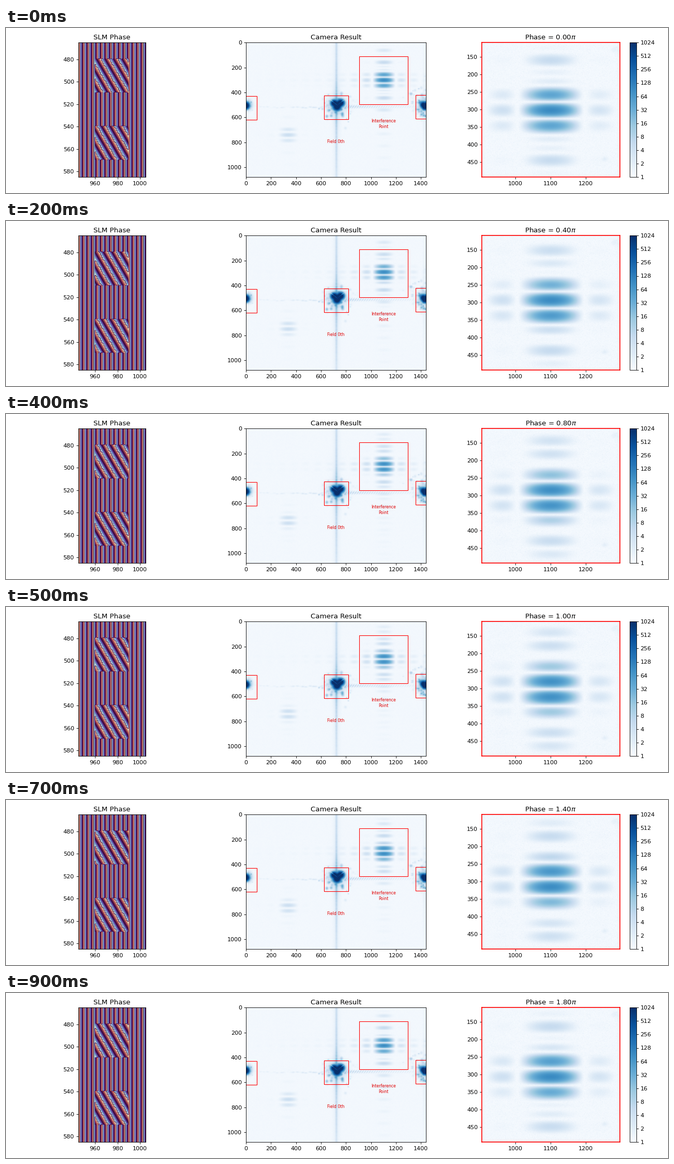
A matplotlib script that plays this animation: 1280x320 px, repeating every 1000 ms.

```python
import numpy as np
import matplotlib.pyplot as plt
from matplotlib.animation import FuncAnimation
from matplotlib.colors import LogNorm
from matplotlib.patches import Rectangle

W, H, DPI = 1280, 320, 80
STEPS = 10
NX, NY = 1440, 1080
LOBE, FRINGE = 96, 48        # envelope zero and fringe spacing, camera pixels
rng = np.random.default_rng(4)

fig = plt.figure(figsize=(W / DPI, H / DPI), dpi=DPI, facecolor="white")


def panel(left, right, top=28.2, bottom=289.2):
    return fig.add_axes([left / W, 1 - bottom / H, (right - left) / W, (bottom - top) / H])


# --- modulator phase -------------------------------------------------------
SX, SY = np.meshgrid(np.arange(945, 1006), np.arange(465, 586))
in_x = (SX >= 960) & (SX < 990)
upper = in_x & (SY >= 480) & (SY < 510)
lower = in_x & (SY >= 540) & (SY < 570)
grating = ((SX + 1) % 4) / 4 + 0.125
ramp = 0.1323 * SX - 0.0764 * SY


def slm_phase(turns):
    phase = np.where(lower, ramp % 1, grating)
    return np.where(upper, (ramp + turns) % 1, phase)


# --- camera image ----------------------------------------------------------
x = np.arange(NX, dtype=np.float32)
y = np.arange(NY, dtype=np.float32)


def add_spot(img, cx, cy, sx, sy, amp):
    """Add a Gaussian spot, touching only its neighbourhood."""
    x0, x1 = max(int(cx - 4 * sx), 0), min(int(cx + 4 * sx) + 1, NX)
    y0, y1 = max(int(cy - 4 * sy), 0), min(int(cy + 4 * sy) + 1, NY)
    if x0 >= x1 or y0 >= y1:
        return
    gx = np.exp(-((x[x0:x1] - cx) / sx) ** 2)
    gy = np.exp(-((y[y0:y1] - cy) / sy) ** 2)
    img[y0:y1, x0:x1] += amp * np.outer(gy, gx)


def scatter(img, cx, cy, dx, dy, count, amp, size=7):
    for _ in range(count):
        s = size * rng.uniform(0.6, 1.4)
        add_spot(img, rng.normal(cx, dx), rng.normal(cy, dy), s, s * rng.uniform(0.7, 1.2),
                 amp * rng.exponential())


def streak(img):
    """Vertical line through the zero order."""
    wobble = np.convolve(rng.uniform(0.5, 1.5, NY + 8), np.ones(9) / 9, "valid")
    along = wobble * (3.6 + 55 * np.exp(-np.abs(y - 500) / 55)) * np.clip((1300 - y) / 500, 0.4, 1)
    img += np.outer(along, np.exp(-((x - 721) / 7) ** 2))
    img += np.outer(0.5 + 5 * np.exp(-np.abs(y - 500) / 80), np.exp(-((x - 721) / 24) ** 2))


def hatch(img):
    """Slanted ticks right of the zero order, faint dashes left of it."""
    band = y[480:550, None] - 515
    ticks = np.cos(np.pi * (x[None] + 0.7 * band) / 19) ** 2
    fade = np.where(x > 760, 7 * np.exp(-(x - 760) / 190) + 0.4, 0)
    img[480:550] += ticks * fade * np.exp(-(band / 10) ** 2)
    for cx in range(120, 620, 26):
        add_spot(img, cx + rng.uniform(-8, 8), 520 + rng.uniform(-5, 5), 11, 5,
                 rng.uniform(0, 1) * (0.5 + 1.5 * cx / 620))


def static_image():
    img = 1 + 0.18 * rng.exponential(size=(NY, NX))
    streak(img)
    hatch(img)
    # zero order: heart-shaped core with a lighter V in it
    for cx, cy, s in ((704, 487, 16), (754, 485, 17), (726, 516, 18), (735, 497, 15)):
        add_spot(img, cx, cy, s, s * 0.95, 2600)
    xs, ys = x[None, 670:790], y[440:560, None]
    vee = np.exp(-((ys - 503 + 0.8 * np.abs(xs - 728)) / 5) ** 2) * (ys < 506) * (ys > 462)
    img[440:560, 670:790] *= 1 - 0.96 * vee
    add_spot(img, 725, 500, 60, 55, 7)
    scatter(img, 725, 500, 38, 42, 70, 9)
    scatter(img, 725, 520, 70, 70, 40, 1.8)
    for cx, cy in ((680, 588), (768, 582), (660, 545), (645, 592)):
        add_spot(img, cx, cy, 9, 9, 14)
    # first orders of the background grating at both edges
    add_spot(img, 4, 506, 13, 16, 2500)
    add_spot(img, 16, 500, 24, 28, 22)
    scatter(img, 20, 505, 22, 30, 24, 7)
    for cx, cy, s in ((1434, 505, 16), (1412, 500, 13), (1424, 518, 12)):
        add_spot(img, cx, cy, s, s * 1.1, 1700)
    add_spot(img, 1388, 482, 11, 9, 70)
    add_spot(img, 1415, 505, 38, 45, 10)
    scatter(img, 1410, 510, 28, 48, 50, 9)
    scatter(img, 1412, 460, 40, 80, 40, 1.6)
    for cx, cy in ((1418, 585), (1400, 578), (1432, 590)):
        add_spot(img, cx, cy, 8, 8, 22)
    img += np.outer(0.9 * np.exp(-np.abs(y - 520) / 280), np.exp(-((x - 1422) / 10) ** 2))
    # weak stray light
    scatter(img, 1325, 440, 12, 25, 10, 1.0)
    scatter(img, 1255, 442, 9, 6, 5, 0.35, 6)
    scatter(img, 1288, 130, 6, 10, 5, 0.35, 6)
    return img


base = static_image()


def order(cx, cy, turns, amp):
    """Fringes of one diffraction order under its sinc envelope."""
    env_x = np.sinc((x - cx) / LOBE) ** 2
    env_x = np.where(x < cx - LOBE, 0.7 * env_x, np.where(x > cx + LOBE, 0.5 * env_x, env_x))
    env_y = np.sinc((y - cy) / LOBE) ** 2
    bands = 0.01 + 0.99 * np.cos(np.pi * ((y - cy) / FRINGE + turns)) ** 2
    return amp * np.outer(env_y * bands, env_x)


def camera(turns):
    return base + order(1101, 302, turns, 92) + order(337, 742, -turns, 3.6)


# --- layout ----------------------------------------------------------------
norm = LogNorm(1, 1024, clip=True)
ax_slm = panel(139.5, 270)
ax_cam = panel(463.8, 811.8)
ax_zoom = panel(920, 1186.6)
ax_bar = panel(1205.8, 1218.8)

im_slm = ax_slm.imshow(slm_phase(0), cmap="twilight", vmin=0, vmax=1, aspect="auto",
                       extent=(944.5, 1005.5, 585.5, 464.5))
ax_slm.set(xlim=(945, 1005), ylim=(585, 465), xticks=(960, 980, 1000),
           yticks=range(480, 581, 20), title="SLM Phase")

first = camera(0)
cam_args = dict(cmap="Blues", norm=norm, aspect="auto", extent=(-0.5, NX - 0.5, NY - 0.5, -0.5))
im_cam = ax_cam.imshow(first, **cam_args)
ax_cam.set(xticks=range(0, 1401, 200), yticks=range(0, 1001, 200), title="Camera Result")
for left, top, w, h in ((-105, 427, 193, 193), (625, 423, 195, 193),
                        (1356, 421, 195, 191), (905, 110, 391, 384)):
    ax_cam.add_patch(Rectangle((left, top), w, h, fill=False, ec="red", lw=1))
label = dict(color="#e00000", fontsize=7, ha="center", va="center")
ax_cam.text(1101, 653, "Interference\nPoint", **label)
ax_cam.text(720, 796, "Field 0th", **label)

im_zoom = ax_zoom.imshow(first, **cam_args)
ax_zoom.set(xlim=(904.5, 1296.5), ylim=(492.5, 108.5), xticks=(1000, 1100, 1200),
            yticks=range(150, 451, 50))
for spine in ax_zoom.spines.values():
    spine.set(color="red", linewidth=1.5)
title = ax_zoom.set_title("")

bar = fig.colorbar(im_cam, cax=ax_bar, ticks=[2 ** k for k in range(11)], format="%d")
bar.minorticks_off()


def draw(i):
    turns = i / STEPS
    img = camera(turns)
    im_slm.set_data(slm_phase(turns))
    im_cam.set_data(img)
    im_zoom.set_data(img)
    title.set_text(rf"Phase = {2 * turns:.2f}$\pi$")
    return im_slm, im_cam, im_zoom, title


anim = FuncAnimation(fig, draw, frames=STEPS, interval=100, repeat=True)
plt.show()
```
